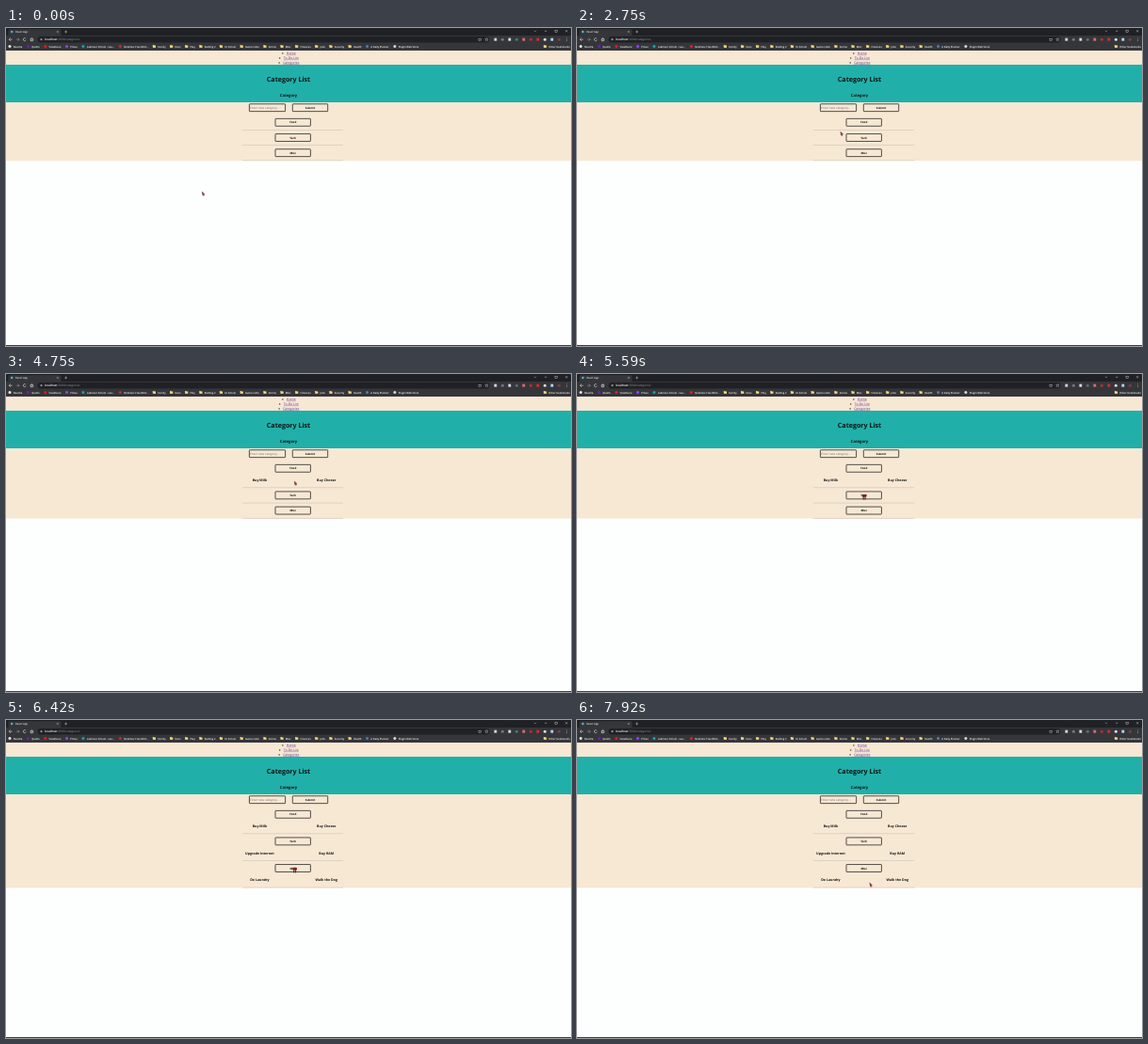
Recreate the animation shown at these times as an HTML page with a canvas. Size 600 by 338 pixels, loop 8000 ms.

```html
<!DOCTYPE html>
<html lang="en">
<head>
<meta charset="utf-8">
<title>Category List</title>
<style>
  html, body { margin: 0; width: 100%; height: 100%; overflow: hidden; background: #fdfffe; }
  canvas { display: block; width: 600px; height: 338px; }
</style>
</head>
<body>
<canvas id="stage"></canvas>
<script>
const W = 600, H = 338, LOOP = 8000, FPS = 12, MID = 304.7;
const FONT = '"Open Sans", "Noto Sans", sans-serif';
const PAPER = '#fdfffe', CREAM = '#f7e8d4', TEAL = '#20b0a9', INK = '#111';
const BAR = '#35363a', DARK = '#202124', PALE = '#e2e3e5', GREY = '#91959a', LINK = '#68358f';

const canvas = document.getElementById('stage');
const ctx = canvas.getContext('2d');
const dpr = window.devicePixelRatio || 1;
canvas.width = W * dpr;
canvas.height = H * dpr;

// Each category opens at the given tick.
const rows = [
  { name: 'Food', items: ['Buy Milk', 'Buy Cheese'], opens: 39 },
  { name: 'Tech', items: ['Upgrade Internet', 'Buy RAM'], opens: 69 },
  { name: 'Misc', items: ['Do Laundry', 'Walk the Dog'], opens: 76 }
];

// Pointer moves between ticks; swing adds a sweep left, then right.
const origin = { x: 208, y: 173.4 };
const moves = [
  { from: 23, to: 33, x: 279.6, y: 109.8 },
  { from: 33, to: 37, x: 299.8, y: 99 },
  { from: 47, to: 57, x: 306, y: 113.6, swing: 42 },
  { from: 57, to: 61, x: 290, y: 116 },
  { from: 62, to: 67, x: 302.6, y: 127.8 },
  { from: 70, to: 75, x: 304.2, y: 156.6 },
  { from: 78, to: 88, x: 310.6, y: 172.6, swing: 40 }
];

const sites = [
  ['Noodra', '#e8e8e8'], ['Quollo', '#6a1fc9'], ['ViewDune', '#f01818'], ['Plivvo', '#9147ff'],
  ['Lakmoor School - Lau...', '#16a3b8'], ['NoteVex: Free Bibli...', '#d9262b']
];
const folders = ['Family', 'Docs', 'Play', 'Raiding 2', 'UI School', 'Game Links',
  'Anime', 'Misc', 'Finances', 'Jobs', 'Security', 'Health'];
const tools = [['A Daily Planner', '#4b7fb5'], ['Plugin Web Store', '#d8d8d8']];
const extensions = ['#d4d5d6', '#77797c', '#d9dadb', '#5b6e7c', '#e06a6a',
  '#b92f35', '#d12f2a', '#dedfe0', '#b8d5ee', '#7c3f4c'];

function rect(x, y, w, h, color) {
  ctx.fillStyle = color;
  ctx.fillRect(x, y, w, h);
}

function round(x, y, w, h, radius, color) {
  ctx.fillStyle = color;
  ctx.beginPath();
  ctx.roundRect(x, y, w, h, radius);
  ctx.fill();
}

const dot = (x, y, r, color) => round(x - r, y - r, 2 * r, 2 * r, r, color);

function text(str, x, y, size, { color = INK, weight = 400, align = 'left' } = {}) {
  ctx.font = `${weight} ${size}px ${FONT}`;
  ctx.textAlign = align;
  ctx.fillStyle = color;
  ctx.fillText(str, x, y + size * 0.36);
  return ctx.measureText(str).width;
}

const bold = (str, x, y, size) => text(str, x, y, size, { weight: 700, align: 'center' });

function line(color, width, ...points) {
  ctx.strokeStyle = color;
  ctx.lineWidth = width;
  ctx.beginPath();
  points.forEach(([x, y]) => ctx.lineTo(x, y));
  ctx.stroke();
}

function cross(x, y, r, turn = 0) {
  for (const a of [turn, turn + Math.PI / 2]) {
    const dx = r * Math.cos(a), dy = r * Math.sin(a);
    line(PALE, 0.45, [x - dx, y - dy], [x + dx, y + dy]);
  }
}

function arrow(x, y, dir, color) {
  line(color, 0.6, [x + dir * 0.2, y - 1.6], [x + dir * 1.8, y], [x + dir * 0.2, y + 1.6]);
  line(color, 0.6, [x - dir * 1.6, y], [x + dir * 1.8, y]);
}

function outline(x, y, w, h) {
  ctx.strokeStyle = '#1c1a18';
  ctx.lineWidth = 0.75;
  ctx.beginPath();
  ctx.roundRect(x - w / 2, y - h / 2, w, h, 0.5);
  ctx.stroke();
}

function drawTabs() {
  const y = 4;
  rect(0, 0, W, 8, DARK);
  round(2.5, 1.2, 56, 7, [1.8, 1.8, 0, 0], BAR);
  dot(6.2, y, 1.3, '#3fb8d0');
  text('React App', 10, y, 2.7, { color: PALE, weight: 600 });
  cross(54.8, y, 1.1, Math.PI / 4);
  cross(63.6, y, 1.4);
  line(PALE, 0.45, [561, 2.8], [562, 3.8], [563, 2.8]);
  line(PALE, 0.45, [572, 3.3], [574.4, 3.3]);
  ctx.lineWidth = 0.4;
  ctx.strokeRect(583, 2.2, 2.2, 2.2);
  cross(595.2, 3.3, 1.5, Math.PI / 4);
}

function drawToolbar() {
  const y = 12.2;
  rect(0, 8, W, 16, BAR);
  arrow(5, y, -1, PALE);
  arrow(12.4, y, 1, GREY);
  ctx.strokeStyle = PALE;
  ctx.lineWidth = 0.6;
  ctx.beginPath();
  ctx.arc(19.8, y, 1.5, 0.3, 5.4);
  ctx.stroke();
  ctx.strokeRect(26.2, y - 0.4, 2.4, 2);
  line(PALE, 0.5, [25.6, y], [27.4, y - 1.7], [29.2, y]);

  round(33.5, 9, 480, 6.5, 3.2, DARK);
  dot(37.5, y, 1.1, GREY);
  const w = text('localhost', 41, y, 3.1, { color: '#fff', weight: 600 });
  text(':3000/categories', 41 + w, y, 3.1, { color: GREY });

  ctx.lineWidth = 0.4;
  ctx.strokeStyle = PALE;
  ctx.strokeRect(502, 11.6, 2.4, 2);
  const star = Array.from({ length: 11 }, (_, i) => {
    const a = i * Math.PI / 5 - Math.PI / 2, r = i % 2 ? 0.8 : 1.8;
    return [510.4 + r * Math.cos(a), y + r * Math.sin(a)];
  });
  line(PALE, 0.35, ...star);

  extensions.forEach((color, i) => {
    const x = 519.8 + 7.5 * i;
    if (i % 2) dot(x, y, 1.5, color);
    else rect(x - 1.4, y - 1.5, 2.8, 3, color);
  });
  for (let i = -1; i <= 1; i++) dot(595.6, y + 1.4 * i, 0.4, PALE);
}

function bookmark(label, x, color) {
  const y = 19.6;
  if (color) {
    dot(x, y, 1.5, color);
  } else {
    rect(x - 1.6, y - 1.5, 1.5, 0.8, '#f5d36e');
    rect(x - 1.6, y - 1.1, 3.2, 2.4, '#f8d775');
  }
  return x + 3.8 + text(label, x + 3.8, y, 2.65, { color: '#fff', weight: 600 });
}

function drawBookmarks() {
  let x = 4;
  for (const [label, color] of [...sites, ...folders.map(name => [name]), ...tools]) {
    x = bookmark(label, x, color) + 6.1;
  }
  bookmark('Other bookmarks', 572.5);
}

function drawLinks() {
  ['Home', 'To-Do List', 'Categories'].forEach((label, i) => {
    const y = 27 + 5 * i;
    const w = text(label, 302.8, y, 3.5, { color: LINK, align: 'center' });
    rect(302.8 - w / 2, y + 1.7, w, 0.35, LINK);
    dot(302.8 - w / 2 - 4, y, 0.65, '#222');
  });
}

function layout(tick) {
  let y = 100.3;
  return rows.map(row => {
    const open = tick >= row.opens;
    const place = { ...row, open, y, end: y + 8.1 + (open ? 12.4 : 0) };
    y = place.end + 8.1;
    return place;
  });
}

function drawPage(places) {
  rect(0, 24, W, H, PAPER);
  rect(0, 24, W, places[2].end - 23.6, CREAM);
  drawLinks();
  rect(0, 39, W, 40, TEAL);
  bold('Category List', 300, 54.8, 7.1);
  bold('Category', 300, 72, 4.1);

  outline(277.5, 84.7, 38.2, 7.9);
  text('Enter new category...', 259.1, 84.7, 3.2, { color: '#75706a' });
  outline(323, 84.7, 37.4, 7.9);
  bold('Submit', 323, 84.7, 2.9);

  for (const { name, items, open, y, end } of places) {
    outline(MID, y, 37.4, 7.9);
    bold(name, MID, y, 2.95);
    if (open) items.forEach((item, i) => bold(item, 269.4 + 70.8 * i, y + 12.7, 3.55));
    rect(251, end - 0.2, 107, 0.5, '#c4bbaf');
  }
  rect(0, H - 1, W, 1, '#3c3e3f');
}

function pointerAt(tick) {
  let { x, y } = origin;
  for (const m of moves) {
    const u = Math.min(1, Math.max(0, (tick - m.from) / (m.to - m.from)));
    const ease = u * u * (3 - 2 * u);
    x += (m.x - x) * ease - (m.swing || 0) * Math.sin(2 * Math.PI * u);
    y += (m.y - y) * ease;
  }
  return { x, y };
}

function drawPointer({ x, y }, hand) {
  ctx.save();
  ctx.translate(x, y);
  if (hand) {
    round(0.2, 0.2, 4.6, 2.8, 1, '#7d2323');
    rect(1.1, 2.4, 0.9, 3.4, '#2c1515');
    rect(3, 2.4, 0.9, 3.4, '#2c1515');
  } else {
    ctx.fillStyle = '#5a4c4e';
    ctx.beginPath();
    ctx.moveTo(0, 0);
    ctx.lineTo(0.4, 4.2);
    ctx.lineTo(3.2, 3);
    ctx.fill();
    round(0.8, 2.6, 1.9, 2.4, 0.7, '#b8484a');
  }
  ctx.restore();
}

function draw(time) {
  const tick = Math.floor((time % LOOP) * FPS / 1000 + 0.01);
  const places = layout(tick);
  const pointer = pointerAt(tick);
  const hand = places.some(p => Math.abs(pointer.x + 2 - MID) < 18.5 && Math.abs(pointer.y + 1 - p.y) < 4);

  ctx.setTransform(dpr, 0, 0, dpr, 0, 0);
  ctx.textRendering = 'geometricPrecision';
  drawPage(places);
  drawTabs();
  drawToolbar();
  drawBookmarks();
  drawPointer(pointer, hand);
}

const start = performance.now();
function loop() {
  draw(performance.now() - start);
  requestAnimationFrame(loop);
}
loop();
</script>
</body>
</html>
```
